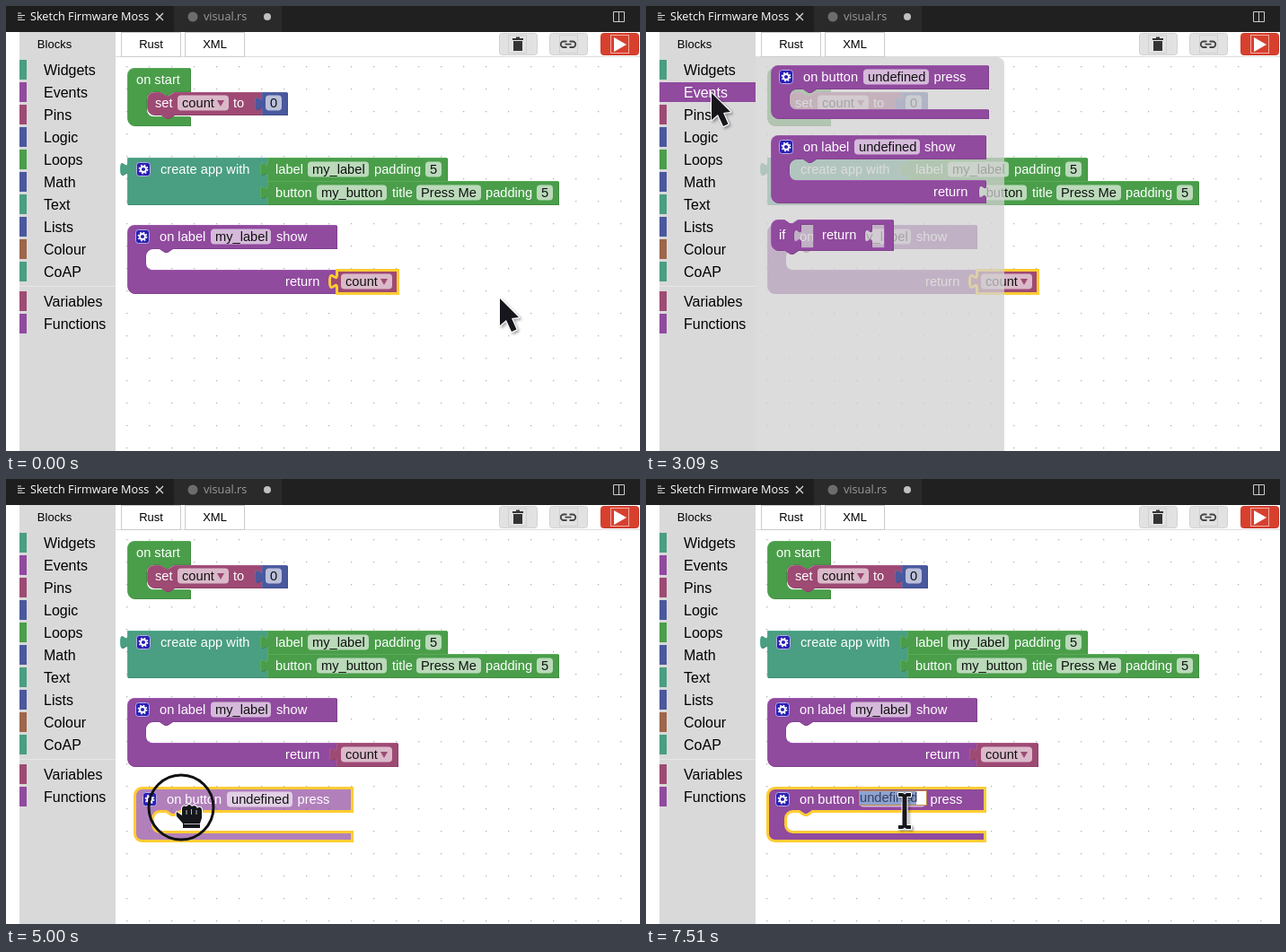
Write an HTML page that moves like this. It is 706 by 496 pixels and loops after 8000 ms.

```html
<!DOCTYPE html>
<html lang="en">
<head>
<meta charset="utf-8">
<title>Block editor</title>
<style>
html, body { margin: 0; width: 100%; height: 100%; overflow: hidden; background: #fff; }
svg { display: block; width: 100vw; height: 100vh; }
text { font: 14.667px "Liberation Sans", Arial, sans-serif; fill: #fff; white-space: pre; }
.dark { fill: #111; }
.cat { font-size: 16px; fill: #000; }
.tab { font-size: 13px; fill: #000; text-anchor: middle; }
.head { font: 12.7px "Open Sans", "Noto Sans", sans-serif; }
.sel > .face { stroke: #fc3; stroke-width: 3; }
.drag > .edge { display: none; }
.drag > .face { fill-opacity: .7; }
</style>
</head>
<body>
<svg id="stage" viewBox="0 0 706 496"></svg>
<script>
const NOTCH = 'l6 4h3l6-4', NOTCH_BACK = 'l-6 4h-3l-6-4';
const SOCKET = 'v5c0 10-8-8-8 7.5s8-2.5 8 7.5';
const PLUG = 'V20c0-10-8 8-8-7.5s8 2.5 8-7.5V0z';

const color = (hue, light = 45.5) => `hsl(${hue} 36% ${light}%)`;
const text = (x, y, s, cls = '') => `<text x="${x}" y="${y}" class="${cls}">${s}</text>`;
const rect = (x, y, w, h, fill, more = '') =>
  `<rect x="${x}" y="${y}" width="${w}" height="${h}" fill="${fill}" ${more}/>`;
const path = (d, more = '') => `<path d="${d}" ${more}/>`;
const group = (id, content) => `<g id="${id}">${content}</g>`;

// Block outlines
const cShape = (w, inner, arm, h, socket = '') =>
  `M8 0H${w}V26H${inner + 30}${NOTCH_BACK}h-7a8 8 0 0 0-8 8V${arm - 8}a8 8 0 0 0 8 8H${w}${socket}V${h}H8a8 8 0 0 1-8-8V8a8 8 0 0 1 8-8z`;
const stackShape = (w, h, socket = '') =>
  `M0 8a8 8 0 0 1 8-8h7${NOTCH}H${w}${socket}V${h}H30${NOTCH_BACK}H8a8 8 0 0 1-8-8z`;
const valueShape = (w, h) => `M0 0H${w}V${h}H0${PLUG}`;
const hole = x => `M${x} 5${SOCKET}V31h14V5z`;

function block(id, x, y, hue, d, content) {
  const layer = (shift, light, cls) =>
    path(d, `class="${cls}" fill="${color(hue, light)}" fill-rule="evenodd" transform="translate(${shift} ${shift})"`);
  return `<g id="${id}" transform="translate(${x} ${y})">` +
    layer(1, 36, 'edge') + layer(0, 57, 'edge') + layer(.5, 45.5, 'face') + content + '</g>';
}
const field = (x, y, w, s) =>
  rect(x, y - 13.5, w, 17, '#fff', 'rx="4" fill-opacity=".62"') + text(x + 5, y, s, 'dark');
const dropdown = (x, y, s) =>
  field(x, y, 57, s) + path(`M${x + 44} ${y - 8}h8l-4 7z`, `fill="${color(330)}"`);
const gear = (x, y) =>
  rect(x - 7.5, y - 7.5, 15, 15, '#2a1fb4', 'rx="3" stroke="#b8aee6"') +
  `<g fill="none" stroke="#fff" transform="translate(${x} ${y})">
    <circle r="3" stroke-width="1.8"/><circle r="4.6" stroke-width="1.6" stroke-dasharray="1.8 1.81"/></g>`;

const onButton = (id, x, y) => block(id, x, y, 290, cShape(242, 20, 49, 59),
  gear(17, 13) + text(36, 18, 'on button') + field(103, 18, 73, 'undefined') + text(181.5, 18, 'press'));

const header = rect(0, 0, 706, 29, '#202021') + rect(0, 0, 187, 29, '#1e1e1e') + rect(187, 0, 120, 29, '#2a2a2b') +
  path('M13 8h4M13 10.500h8M13 13h5M13 15.500h8', 'stroke="#ddd"') +
  text(27, 16, 'Sketch Firmware Moss', 'head') +
  path('M167 8l8 8m0-8l-8 8', 'stroke="#ddd" stroke-width="1.2"') +
  '<circle cx="208" cy="12" r="5.500" fill="#6c6c6c"/>' +
  `<g opacity=".52">${text(220, 16, 'visual.rs', 'head')}</g>` +
  '<circle cx="291" cy="12" r="4" fill="#c0c0c0"/>' +
  path('M676.5 6.500h12v11h-12zM682.500 6.500v11', 'fill="none" stroke="#ccc"');

const button = (x, fill, edge) => rect(x + .5, 30.5, 42, 24, fill, `rx="3" stroke="${edge}"`);
const toolbar = path('M122 56.500H706', 'stroke="#ddd"') +
  [[128, 'Rust'], [199, 'XML']].map(([x, s]) =>
    rect(x + .5, 29.5, 66, 27, '#fff', 'stroke="#ccc"') + text(x + 33.5, 47, s, 'tab')).join('') +
  button(549, '#e2e2e2', '#d2d2d2') + button(605, '#e2e2e2', '#d2d2d2') + button(662, '#d8402e', '#c9392a') +
  [559.5, 616.5].map(x => rect(x, 32.5, 20, 20, 'none', 'stroke="#d0d0d0"')).join('') +
  path('M564 36h4v-1.500h4v1.500h4v2h-12zM565 39h10v11h-10z', 'fill="#333"') +
  path('M624.500 39.500h-3.500a3.200 3.200 0 0 0 0 6.500h3.500M627.500 39.500h3.500a3.200 3.200 0 0 1 0 6.500h-3.500M622.500 42.700h7',
    'fill="none" stroke="#444" stroke-width="1.800"') +
  rect(673.5, 32.5, 20, 20, 'none', 'stroke="#f0a9a0"') + path('M677 35l14 8-14 8z', 'fill="#fff"');

const categories = [['Widgets', 160], ['Events', 290], ['Pins', 330], ['Logic', 230], ['Loops', 120], ['Math', 230],
  ['Text', 160], ['Lists', 230], ['Colour', 20], ['CoAP', 160], ['Variables', 330], ['Functions', 290]];
const toolbox = rect(15, 29, 107, 467, '#d9d9d9') + text(54, 47, 'Blocks', 'tab') +
  categories.map(([name, hue], i) => {
    const y = 60 + 25 * i + (i > 9 ? 8 : 0);
    return rect(15, y, 8, 22, color(hue)) + text(42, y + 17, name, 'cat');
  }).join('') + path('M15 312.500H122', 'stroke="#e6e6e6"');

const workspace = rect(122, 57, 584, 439, 'url(#dots)') +
  block('start', 135, 69, 120, cShape(70, 21, 54, 64), text(10, 18, 'on start')) +
  block('set', 157, 96, 330, stackShape(128, 25, SOCKET),
    text(9, 17, 'set') + dropdown(34, 17, 'count') + text(96, 17, 'to')) +
  block('zero', 285, 96, 230, valueShape(28, 25), field(4, 17, 18, '0')) +
  block('app', 135, 169, 160, `M0 0H156${SOCKET}V26${SOCKET}V52H0${PLUG}`,
    gear(18, 13) + text(37, 18, 'create app with')) +
  block('label', 291, 169, 120, valueShape(200, 26),
    text(9, 18, 'label') + field(45, 18, 68, 'my_label') + text(119, 18, 'padding') + field(176, 18, 18, '5')) +
  block('button', 291, 195, 120, valueShape(324, 26),
    text(9, 18, 'button') + field(55, 18, 78, 'my_button') + text(139, 18, 'title') +
    field(166, 18, 72, 'Press Me') + text(243, 18, 'padding') + field(300, 18, 18, '5')) +
  block('show', 135, 244, 290, cShape(233, 20, 50, 76, SOCKET),
    gear(17, 13) + text(36, 18, 'on label') + field(93, 18, 67, 'my_label') + text(166, 18, 'show') +
    text(176, 68, 'return')) +
  block('count', 368, 294, 330, valueShape(68, 26), dropdown(5, 18, 'count'));

const flyout = rect(15, 85, 107, 22, color(290)) + text(42, 102, 'Events', 'cat" style="fill:#fff') +
  path('M122 57H391a8 8 0 0 1 8 8V496H122z', 'fill="#d2d2d2" fill-opacity=".76"') +
  onButton('template', 139, 66) +
  block('showTemplate', 139, 144, 290, cShape(239, 20, 50, 75, SOCKET),
    gear(17, 13) + text(36, 18, 'on label') + field(93, 18, 73, 'undefined') + text(171, 18, 'show') +
    text(181, 68, 'return')) +
  block('ifTemplate', 139, 238, 290, stackShape(136, 34) + hole(33) + hole(112),
    text(9, 22, 'if') + text(57, 22, 'return'));

const editor = rect(237.5, 347.5, 75, 16, '#fff', 'stroke="#c08a4a"') +
  rect(238, 348, 63, 15, '#8ea3cf') + text(238, 360, 'undefined', 'dark" style="fill:#333f66');

const ink = 'fill="#15151c" stroke="#fff" stroke-width="2" stroke-linejoin="round" paint-order="stroke"';
const pointers =
  group('arrow', path('M0 0V30l7-6 6 13 5.500-2.500-5.500-12.500 8-1z', ink + ' filter="url(#shadow)"')) +
  group('hand', '<circle id="ring" r="36" fill="none" stroke="#111" stroke-width="3"/>' +
    path('M-5 5q-1 2 0 5l7 8v5h19v-5l2-6v-10q-2-4-5-1-2-5-6-2-3-4-6 0-5-2-5 3v7z', ink) +
    path('M3 18.500h18M6 3v5M11.500 2v6M17 3v5', 'fill="none" stroke="#bbb"')) +
  group('beam', path('M-7-20h5l2 1.500 2-1.500h5v4h-4.500v32h4.500v4h-5l-2-1.500-2 1.500h-5v-4h4.500v-32h-4.500z',
    ink + ' filter="url(#shadow)"'));

const stage = document.getElementById('stage');
stage.innerHTML = `<defs>
  <pattern id="dots" x="134" y="67" width="25" height="25" patternUnits="userSpaceOnUse">
    ${rect(0, 0, 1.3, 1.3, '#b4b4b4')}</pattern>
  <filter id="shadow" x="-50%" y="-30%" width="220%" height="170%">
    <feDropShadow dx="2" dy="2" stdDeviation="1.500" flood-opacity=".35"/></filter>
  </defs>` + header + toolbar + workspace + toolbox + group('flyout', flyout) +
  onButton('placed', 135, 344) + group('editor', editor) + pointers;

const $ = id => document.getElementById(id);
const show = (id, on) => $(id).setAttribute('display', on ? 'inline' : 'none');
const move = (id, x, y) => $(id).setAttribute('transform', `translate(${x} ${y})`);

// Start time, pointer, x, y
const steps = [
  [0, 'arrow', 550, 326], [520, 'arrow', 341, 296], [990, 'arrow', 74, 221], [1590, 'arrow', 99, 110],
  [2020, 'arrow', 78, 97], [2570, 'arrow', 65, 97], [3090, 'arrow', 73, 97], [3590, 'arrow', 205, 82],
  [4090, 'arrow', 200, 83], [4520, 'hand', 195, 230], [5000, 'hand', 195, 366], [5550, 'hand', 191, 374],
  [5980, 'arrow', 257, 375], [6510, 'arrow', 272, 357], [6960, 'beam', 289, 370], [7510, 'beam', 288, 370]];

function draw(now) {
  const t = now % 8000;
  const [start, pointer, x, y] = steps.findLast(s => s[0] <= t);
  const dragging = pointer === 'hand';
  for (const id of ['arrow', 'hand', 'beam']) show(id, id === pointer);
  move(pointer, x, y);
  $('ring').setAttribute('r', start === 5550 ? 43 : 36);
  $('ring').setAttribute('opacity', start === 5550 ? .5 : 1);

  show('flyout', t >= 2020 && t < 4520);
  $('template').classList.toggle('sel', t >= 3590);
  $('count').classList.toggle('sel', t < 4520);
  show('placed', t >= 4520);
  $('placed').setAttribute('class', dragging ? 'sel drag' : 'sel');
  move('placed', dragging ? x - 52 : 135, dragging ? y - 22 : 344);
  show('editor', t >= 7510);
  requestAnimationFrame(draw);
}
draw(performance.now());
</script>
</body>
</html>
```
